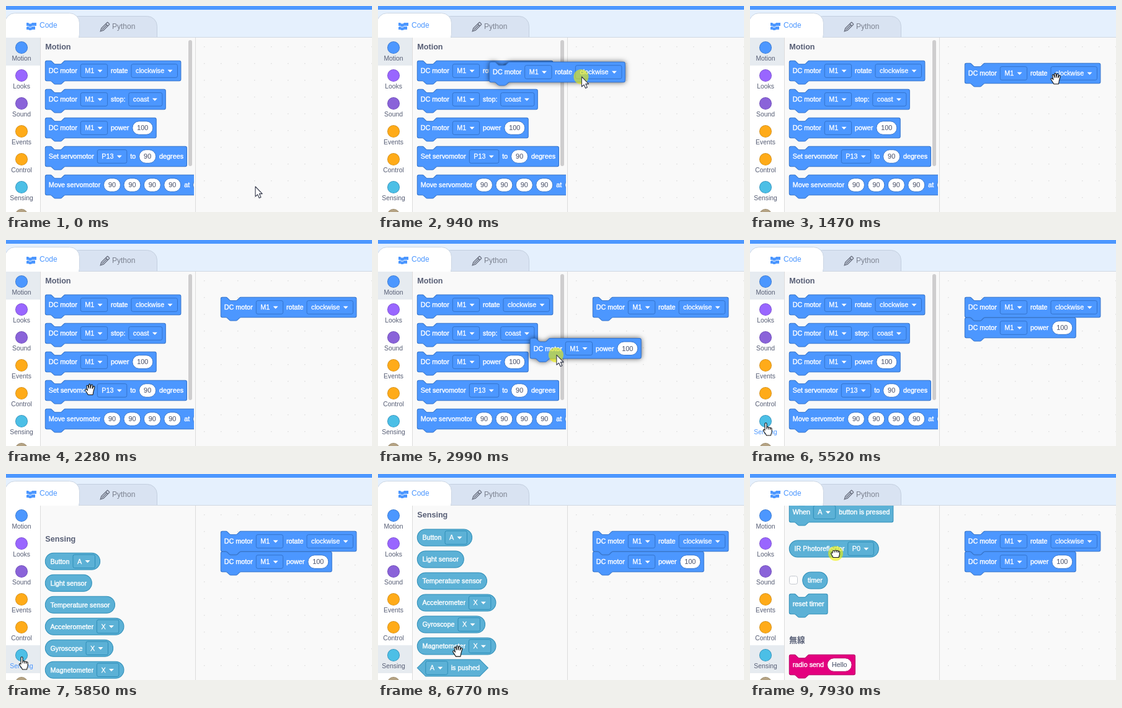
Recreate the animation shown at these times as an HTML page with a canvas. Size 590x332 px, loop 8000 ms.

```html
<!DOCTYPE html>
<html lang="en">
<head>
<meta charset="utf-8">
<title>Block editor</title>
<style>
html, body { margin: 0; width: 100%; height: 100%; overflow: hidden; background: #f9f9f9; }
canvas { display: block; }
</style>
</head>
<body>
<canvas id="stage" width="590" height="332"></canvas>
<script>
const ctx = document.getElementById('stage').getContext('2d');
const LOOP = 8000, U = 0.675, GAP = 5.4;
const SANS = '"Liberation Sans", Arial, "Noto Sans CJK JP", "Noto Sans CJK", sans-serif';
const BLUE = ['#4c97ff', '#3373cc'], TEAL = ['#5cb1d6', '#2e8eb8'], PINK = ['#e4007f', '#b80066'];
const INK = '#575e75';

const steps = [0];
for (const [a, b, n] of [[70, 450, 6], [700, 1250, 8], [1470, 2180, 10], [2280, 3060, 11],
  [3140, 3220, 2], [3820, 3820, 1], [4450, 5140, 10], [5450, 6010, 8], [6290, 6290, 1],
  [6460, 6940, 7], [7220, 7550, 5], [7780, 7780, 1], [7930, 7930, 1]])
  for (let i = 0; i < n; i++) steps.push(a + (n > 1 ? (b - a) * i / (n - 1) : 0));

// Pointer path: time, x, y, look, pressed
const path = [
  [0, 402, 291, 'arrow'], [150, 322, 218, 'arrow'], [290, 172, 112, 'open'], [450, 212, 112, 'open'],
  [690, 212, 112, 'open'], [700, 276, 112, 'arrow', 1], [935, 328, 114, 'arrow', 1],
  [1250, 495, 116.5, 'arrow', 1], [1465, 495, 116.5, 'open'], [1620, 430, 140, 'arrow'],
  [1930, 230, 222, 'open'], [2180, 141, 258, 'open'], [2280, 135.5, 241, 'open'],
  [2500, 106, 207, 'open'], [2660, 106, 207, 'arrow', 1], [3060, 332, 180, 'arrow', 1],
  [3220, 394, 171, 'arrow', 1], [3815, 394, 171, 'arrow'], [4380, 394, 171, 'arrow'],
  [4600, 335, 149, 'arrow'], [4760, 232, 180, 'open'], [4980, 60, 268, 'arrow'],
  [5050, 38, 287, 'point'], [5140, 25.5, 295, 'point'], [5445, 25.5, 295, 'point', 1],
  [5515, 25.5, 295, 'point'], [6280, 25.5, 295, 'point'], [6290, 27, 295, 'point'],
  [6400, 27, 295, 'point'], [6535, 58, 291, 'arrow'], [6610, 85, 287, 'open'],
  [6770, 128, 285, 'open'], [6940, 136, 295, 'open'], [7150, 136, 295, 'open'],
  [7300, 132, 235, 'arrow'], [7460, 127, 132, 'open'], [7550, 126.5, 117, 'open'],
  [7770, 126, 117, 'fist'], [7920, 126, 117, 'fist'], [7930, 138, 128, 'fist', 1],
  [LOOP, 138, 128, 'fist', 1]
];

const cursors = {
  arrow: 'M0 0V16L3.6 12.8 6.2 18.4 8.9 17.2 6.4 11.6H11.2z',
  open: 'M-3 8.5L-7.5 1.5c-1-2 1-3 2.2-1.6L-4 1.5-5.5-5c-.4-1.8 1.8-2.4 2.4-.6L-2-2V-7.5c0-1.8 2.3-1.8 2.4 0L.6-2 1.8-7c.4-1.7 2.6-1.2 2.4.5L3.6-1.6 5.2-4.6c.8-1.4 2.6-.5 2.1 1L5.5 3 4.5 8.5z',
  fist: 'M-4 6.5L-7 1c-.8-1.8.6-2.6 2-1.5V-3c0-1.8 2-2 3-.8c.5-1.6 2.4-1.6 3 0c.7-1.3 2.5-1 3 .4c1-.9 2.4-.2 2.4 1.2V2L5 6.5z',
  point: 'M-1.5 1.2c0-2 3-2 3 0V7c.8-1 2.6-.8 2.9.5c1-.9 2.5-.6 2.8.6c1.2-.7 2.4 0 2.4 1.5V14c0 2-1.2 3-1.5 6H1c-1-3-4-5-5-8.2c-.2-1.6 1.2-1.8 2.5-.2z'
};

const motor = 'DC motor|[M1|rotate|[clockwise', power = 'DC motor|[M1|power|(100';
const motionBlocks = [motor, 'DC motor|[M1|stop:|[coast', power,
  'Set servomotor|[P13|to|(90|degrees', 'Move servomotor|(90|(90|(90|(90|at|(10'];
const sensors = ['Button|[A', 'Light sensor', 'Temperature sensor', 'Accelerometer|[X',
  'Gyroscope|[X', 'Magnetometer|[X'];
const categories = [['Motion', '#4c97ff', '#3373cc'], ['Looks', '#9966ff', '#774dcb'],
  ['Sound', '#8a63d9', '#6a48b5'], ['Events', '#ffab19', '#cf8b17'], ['Control', '#ffab19', '#cf8b17'],
  ['Sensing', '#4cbfe6', '#2e8eb8'], ['', '#b5a384', '#978668']];

function text(s, x, y, size, color, { align = 'left', weight = '', thick = 0 } = {}) {
  ctx.font = `${weight} ${size}px ${SANS}`;
  ctx.textAlign = align;
  ctx.textBaseline = 'middle';
  ctx.fillStyle = ctx.strokeStyle = color;
  ctx.fillText(s, x, y + 0.8);
  ctx.lineWidth = thick;
  if (thick) ctx.strokeText(s, x, y + 0.8);
}

function box(x, y, w, h, r, fill, stroke) {
  ctx.beginPath();
  ctx.roundRect(x, y, w, h, r);
  if (fill) { ctx.fillStyle = fill; ctx.fill(); }
  if (stroke) { ctx.strokeStyle = stroke; ctx.lineWidth = 1; ctx.stroke(); }
}

function dot(x, y, r, fill) {
  ctx.beginPath();
  ctx.arc(x, y, r, 0, 7);
  ctx.fillStyle = fill;
  ctx.fill();
}

function shape(kind, w) {
  if (kind === 'round') return `M20 4H${w - 20}a20 20 0 0 1 0 40H20a20 20 0 0 1 0-40z`;
  if (kind === 'hex') return `M20 4H${w - 20}l20 20-20 20H20L0 24z`;
  return `M0 4A4 4 0 0 1 4 0H12c2 0 3 1 4 2l4 4c1 1 2 2 4 2h12c2 0 3-1 4-2l4-4c1-1 2-2 4-2H${w - 4}` +
    'a4 4 0 0 1 4 4v40a4 4 0 0 1-4 4H48c-2 0-3 1-4 2l-4 4c-1 1-2 2-4 2H24c-2 0-3-1-4-2l-4-4c-1-1-2-2-4-2H4a4 4 0 0 1-4-4z';
}

// Parts are split by "|": "[" marks a menu, "(" an input, anything else a label
function block(spec, x, cy, [fill, edge], kind = 'stack', mode = '') {
  x += 0.3;
  cy += 0.5;
  ctx.font = `10.8px ${SANS}`;
  const parts = spec.split('|').map(p => {
    const type = '[('.includes(p[0]) ? p[0] : '', s = type ? p.slice(1) : p;
    return { type, s, w: ctx.measureText(s).width + (type === '[' ? 28.3 : type ? 15 : 0) };
  });
  const pad = { stack: GAP, round: 8.1, hex: 13.5 }[kind];
  const w = parts.reduce((sum, p) => sum + p.w + GAP, 2 * pad - GAP);
  const outline = new Path2D(shape(kind, w / U));
  ctx.save();
  ctx.translate(x, cy - 24 * U);
  ctx.scale(U, U);
  ctx.fillStyle = mode === 'ghost' ? '#bfbfbf' : fill;
  if (mode === 'drag') { ctx.shadowColor = 'rgba(0,0,0,.7)'; ctx.shadowBlur = 8; }
  ctx.fill(outline);
  ctx.shadowColor = 'transparent';
  if (mode !== 'ghost') {
    ctx.strokeStyle = edge;
    ctx.lineWidth = 1.5;
    ctx.stroke(outline);
  }
  ctx.restore();
  if (mode === 'ghost') return;
  x += pad;
  for (const { type, s, w } of parts) {
    if (type === '[') {
      box(x, cy - 10.8, w, 21.6, 2.7, fill, edge);
      text(s, x + 7, cy, 10.8, '#fff', { thick: 0.3 });
      const ax = x + w - 12;
      ctx.beginPath();
      ctx.moveTo(ax - 4, cy - 1.7);
      ctx.lineTo(ax + 4, cy - 1.7);
      ctx.lineTo(ax, cy + 2.6);
      ctx.fill();
    } else if (type) {
      box(x, cy - 10.8, w, 21.6, 10.8, '#fff', edge);
      text(s, x + 7.5, cy, 10.8, INK, { thick: 0.15 });
    } else {
      text(s, x, cy, 10.8, '#fff', { thick: 0.4 });
    }
    x += w + GAP;
  }
}

function tabs() {
  ctx.fillStyle = '#e5f0fd';
  ctx.fillRect(0, 0, 590, 51);
  ctx.fillStyle = '#4c97ff';
  ctx.fillRect(0, 0, 590, 6);
  ctx.save();
  ctx.beginPath();
  ctx.rect(0, 0, 590, 51);
  ctx.clip();
  box(100.5, 16.5, 143, 50, 16, '#d9e3f2', '#c3cfdf');
  ctx.fillStyle = '#d0d8e2';
  ctx.fillRect(118, 50, 472, 1);
  box(-1.5, 11.5, 120, 50, 16, '#fff', '#cbd6e4');
  ctx.restore();
  text('Code', 54, 31, 12, '#4c97ff');
  text('Python', 171, 33, 12, '#7c8290');
  ctx.fillStyle = '#4c97ff';
  ctx.fill(new Path2D('M33 27h3l1.5 1.5h3L42 27h7v5h-7l-1.5 1.5h-3L36 32h-3zM35 33h1l1.5 1.5h3L42 33h5v5h-5l-1.5 1h-3L36 38h-3v-4z'));
  ctx.save();
  ctx.translate(159, 34);
  ctx.rotate(Math.PI / 4);
  ctx.strokeStyle = '#6a7080';
  ctx.lineWidth = 1.4;
  ctx.stroke(new Path2D('M-2.4-8a1 1 0 0 1 1-1h2.8a1 1 0 0 1 1 1V5L0 9.5-2.4 5zM-2.4-5H2.4M0-5V6'));
  ctx.restore();
}

function sidebar(selected, hover) {
  ctx.fillStyle = '#fff';
  ctx.fillRect(0, 51, 55, 281);
  ctx.fillStyle = '#e6ebf0';
  ctx.fillRect(0, 51 + 45 * selected, 55, 45);
  ctx.fillStyle = '#dcdcdc';
  ctx.fillRect(55, 51, 1, 281);
  categories.forEach(([name, fill, edge], i) => {
    const y = 67 + 45 * i;
    dot(25, y, 10, edge);
    dot(25, y, 9.2, fill);
    text(name, 25, y + 17.7, 10.4, hover && i === 5 ? '#4c97ff' : INK, { align: 'center' });
  });
}

const heading = (s, y) => text(s, 63.3, y, 12.6, INK, { weight: 'bold' });

function motionList(dy) {
  heading('Motion', 66 + dy);
  motionBlocks.forEach((b, i) => block(b, 63, 104 + 46 * i + dy, BLUE));
}

function sensingList(dy) {
  heading('Sensing', 66 + dy);
  sensors.forEach((b, i) => block(b, 63, 102 + 35 * i + dy, TEAL, 'round'));
  block('[A|is pushed', 63, 312 + dy, TEAL, 'hex');
  block('When|[A|button is pressed', 63, 361 + dy, TEAL);
  block('IR Photoreflector|[P0', 63, 420 + dy, TEAL, 'round');
  box(63.5, 464.5 + dy, 13, 13, 3, '#fff', '#c4c8cf');
  block('timer', 84.5, 471 + dy, TEAL, 'round');
  block('reset timer', 63, 509 + dy, TEAL);
  heading('無線', 568 + dy);
  block('radio send|(Hello', 63, 607 + dy, PINK);
}

const ramp = (t, a, b) => Math.min(1, Math.max(0, (t - a) / (b - a)));

function palette(t) {
  const jump = 330, slide = jump * (1 - (1 - ramp(t, 5540, 6010)) ** 2);
  ctx.save();
  ctx.beginPath();
  ctx.rect(56, 51, 247, 281);
  ctx.clip();
  if (slide < jump) motionList(-slide);
  if (slide > 0) sensingList(jump - slide - 300 * ramp(t, 6780, 6940));
  if (!slide) box(294, 55, 6, 203, 3, '#cecdce');
  ctx.restore();
  ctx.fillStyle = '#dcdcdc';
  ctx.fillRect(305, 51, 1, 281);
}

function pointer(t) {
  let i = path.length - 2;
  while (path[i][0] > t) i--;
  const [a, x, y, look, pressed] = path[i], [b, x2, y2] = path[i + 1], k = ramp(t, a, b);
  return { x: x + (x2 - x) * k, y: y + (y2 - y) * k, look, pressed };
}

function workspace(t, p) {
  if (t >= 1465) block(motor, 346, 108, BLUE);
  else if (t >= 700) block(motor, 63 + p.x - 212, 104 + p.y - 112, BLUE, 'stack', 'drag');
  if (t >= 3815) block(power, 346, 141, BLUE);
  else if (t >= 2660) {
    if (t >= 3200) block(power, 346, 141, BLUE, 'stack', 'ghost');
    block(power, 63 + p.x - 106, 196 + p.y - 207, BLUE, 'stack', 'drag');
  }
}

function cursor({ x, y, look, pressed }) {
  if (pressed) dot(x - (look === 'arrow' ? 1 : 0), y, 12, 'rgba(240,240,0,.6)');
  const outline = new Path2D(cursors[look]);
  ctx.save();
  ctx.translate(x, y);
  ctx.fillStyle = '#fff';
  ctx.strokeStyle = look === 'arrow' ? '#33384a' : '#111';
  ctx.lineWidth = 1.1;
  ctx.lineJoin = 'round';
  ctx.fill(outline);
  ctx.stroke(outline);
  if (look === 'point') ctx.stroke(new Path2D('M1.5 7v3M4.4 7.5v3M7.2 8.1v2.6'));
  if (look === 'fist') ctx.stroke(new Path2D('M-2-3.5v2M1-3.5v2M4-3v2'));
  ctx.restore();
}

function draw(now) {
  const clock = now % LOOP + 11;
  const t = steps.filter(s => s <= clock).pop();
  const p = pointer(t);
  ctx.fillStyle = '#f9f9f9';
  ctx.fillRect(0, 0, 590, 332);
  ctx.fillStyle = '#dcdcdc';
  for (let x = 319; x < 590; x += 27)
    for (let y = 65; y < 332; y += 27) ctx.fillRect(x, y, 1.4, 1.4);
  palette(t);
  sidebar(t >= 5590 ? 5 : 0, t >= 5050 && t < 6520);
  tabs();
  workspace(t, p);
  cursor(p);
  requestAnimationFrame(draw);
}
requestAnimationFrame(draw);
</script>
</body>
</html>
```
